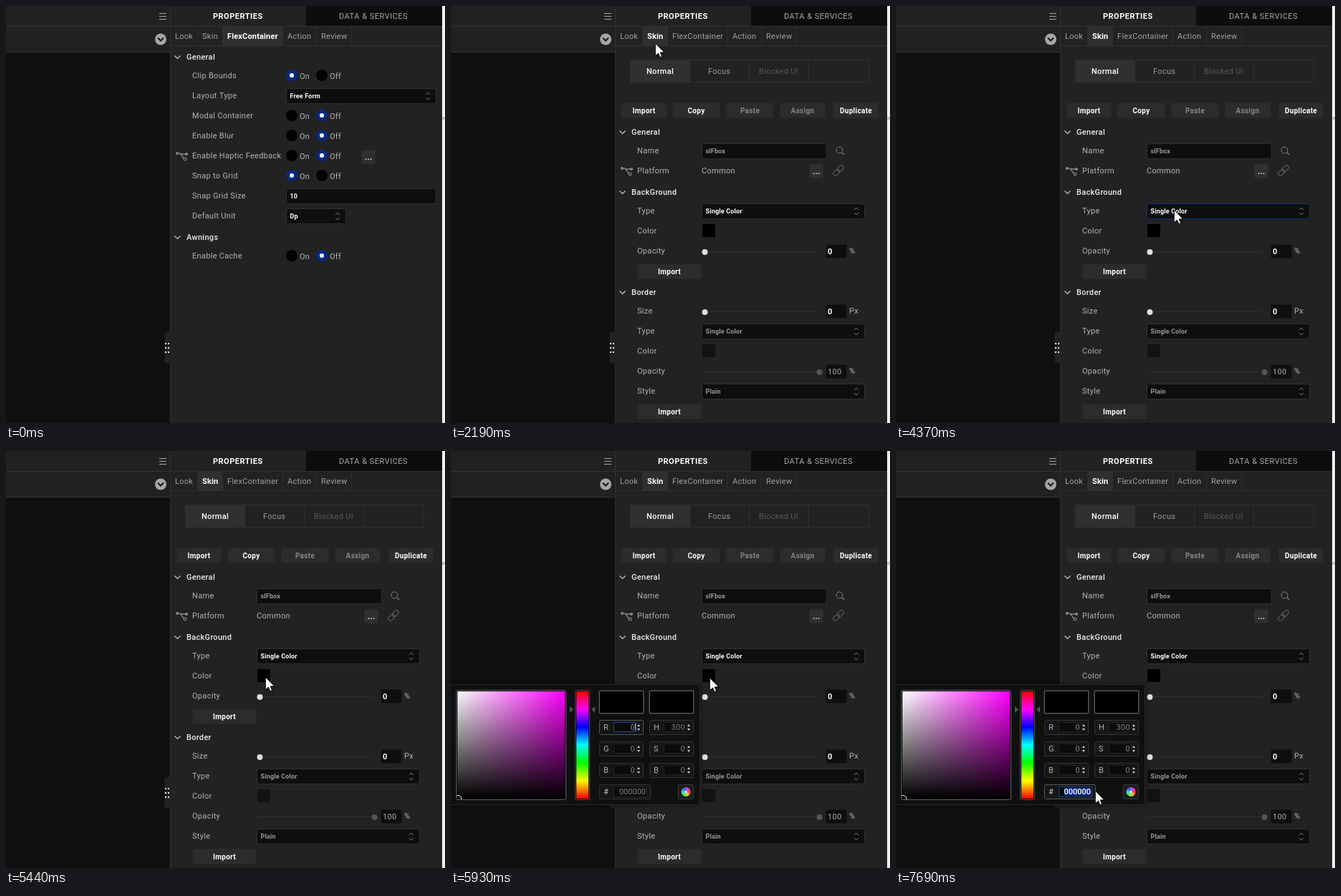
Animation of 613 by 583 pixels, one loop 8000 ms. Source, as an HTML page with a canvas:

```html
<!DOCTYPE html>
<html lang="en">
<head>
<meta charset="utf-8">
<title>Properties panel</title>
<style>
html, body { margin: 0; width: 100%; height: 100%; overflow: hidden; background: #101010; }
canvas { display: block; }
</style>
</head>
<body>
<canvas id="stage" width="613" height="583"></canvas>
<script>
const LOOP = 8000;
const screen = document.getElementById('stage').getContext('2d');
const layer = document.createElement('canvas');
layer.width = 613;
layer.height = 583;
const popup = layer.getContext('2d');
let g = screen;

const GREY = '#b4b4b4', DIM = '#858585', WHITE = '#fff', BLUE = '#062a80';

// ---- drawing helpers ----
function rect(x, y, w, h, color) {
  g.fillStyle = color;
  g.fillRect(x, y, w, h);
}
function box(x, y, w, h, fill, border, radius = 2) {
  g.beginPath();
  g.roundRect(x + .5, y + .5, w - 1, h - 1, radius);
  g.fillStyle = fill;
  g.fill();
  if (border) {
    g.strokeStyle = border;
    g.lineWidth = 1;
    g.stroke();
  }
}
function line(color, width, ...pts) {
  g.beginPath();
  for (let i = 0; i < pts.length; i += 2) g.lineTo(pts[i], pts[i + 1]);
  g.strokeStyle = color;
  g.lineWidth = width;
  g.stroke();
}
function shape(color, ...pts) {
  g.beginPath();
  for (let i = 0; i < pts.length; i += 2) g.lineTo(pts[i], pts[i + 1]);
  g.closePath();
  g.fillStyle = color;
  g.fill();
}
function dot(x, y, r, color) {
  g.beginPath();
  g.arc(x, y, r, 0, 7);
  g.fillStyle = color;
  g.fill();
}
function ring(x, y, r, color) {
  g.beginPath();
  g.arc(x, y, r, 0, 7);
  g.strokeStyle = color;
  g.lineWidth = 1;
  g.stroke();
}
// y is the middle of the line of text
function text(s, x, y, { color = GREY, size = 11, weight = 400, gap = .3, align = 'left' } = {}) {
  g.font = `${weight} ${size}px Roboto, sans-serif`;
  g.letterSpacing = gap + 'px';
  g.textAlign = align;
  g.fillStyle = color;
  g.fillText(s, x, y + Math.round(size * .36));
}

// ---- widgets ----
const label = (s, y) => text(s, 260, y);

function heading(s, y) {
  line('#c8c8c8', 1.2, 235.5, y - 1.5, 239.5, y + 2.5, 243.5, y - 1.5);
  text(s, 252, y, { color: '#ececec', weight: 500 });
}
function button(s, x, y, w, color = WHITE) {
  box(x, y, w, 22, '#2c2c2c');
  text(s, x + w / 2, y + 11, { color, size: 10, weight: 700, align: 'center' });
}
function more(x, y) {
  box(x, y, 20, 20, '#303030');
  text('...', x + 5, y + 10, { color: WHITE, weight: 700 });
}
function field(s, x, y, w, color = WHITE, border = '#303030') {
  box(x, y, w, 22, '#0e0e0e', border, 3);
  text(s, x + 5.5, y + 11, { color, size: 9, weight: 700, gap: .15 });
}
function select(s, x, y, w, color, border) {
  field(s, x, y, w, color, border);
  const cx = x + w - 12, cy = y + 11;
  line('#777', 1, cx - 3, cy - 2, cx, cy - 5, cx + 3, cy - 2);
  line('#777', 1, cx - 3, cy + 2, cx, cy + 5, cx + 3, cy + 2);
}
function radio(x, y, s, on) {
  dot(x, y, 8, on ? BLUE : '#030303');
  if (on) dot(x, y, 3, WHITE);
  text(s, x + 11, y + 1);
}
function toggle(s, y, on) {
  label(s, y);
  radio(399, y, 'On', on);
  radio(441, y, 'Off', !on);
}
function slider(s, y, x, value, unit, active) {
  label(s, y);
  line('#303030', 1, 351, y + 1.5, 511, y + 1.5);
  dot(x, y + 2, 4, active ? '#dedede' : '#555');
  box(523, y - 9, 30, 20, '#0e0e0e');
  text(value, 526, y + 1, { color: active ? WHITE : '#8c8c8c', weight: active ? 700 : 500 });
  text(unit, 556, y);
}
function fork(y) {
  line('#a0a0a0', 1.2, 238, y - 4, 243, y - 4, 246, y, 248, y + 3);
  line('#a0a0a0', 1.2, 243, y - 3, 253, y - 3);
  ring(239, y - 4, 1.5, '#a0a0a0');
  ring(252, y - 3, 1.5, '#a0a0a0');
  ring(250, y + 4, 2, '#a0a0a0');
}

// ---- panels ----
function frame(active) {
  rect(0, 0, 613, 583, '#101010');
  rect(0, 0, 229, 65, '#212121');
  rect(0, 28, 229, 1, '#343434');
  rect(0, 64, 229, 1, '#343434');
  for (let y = 10; y < 19; y += 4) rect(214, y, 10, 1, '#a8a8a8');
  dot(216, 46.5, 8, '#a6a6a6');
  line('#141414', 2, 212, 44.5, 216, 48.5, 220, 44.5);

  rect(229, 0, 380, 583, '#222');
  rect(229, 0, 1, 583, '#303030');
  rect(419, 0, 190, 28, '#0d0d0d');
  rect(230, 28, 379, 1, '#303030');
  rect(230, 55, 379, 1, '#303030');
  rect(609, 0, 4, 583, '#f1f1f1');
  rect(609, 155, 4, 4, '#c4c4c4');
  text('PROPERTIES', 289, 14, { color: WHITE, weight: 700, gap: .5 });
  text('DATA & SERVICES', 465, 14, { color: '#a8a8a8', gap: .5 });

  const tabs = [['Look', 230, 267], ['Skin', 267, 302], ['FlexContainer', 302, 386],
                ['Action', 386, 433], ['Review', 433, 482]];
  for (const [name, left, right] of tabs) {
    const on = name === active;
    if (on) rect(left, 29, right - left, 26, '#2f2f2f');
    rect(right, 29, 1, 26, '#2f2f2f');
    text(name, left + (left > 230 ? 7 : 6), 42,
      { color: on ? WHITE : '#a2a2a2', weight: on ? 700 : 400, gap: on ? .15 : .3 });
  }
  box(221, 455, 14, 45, '#222', null, 3);
  rect(229, 455, 1, 45, '#222');
  for (let i = 0; i < 6; i++) rect(222 + i % 2 * 4, 471 + (i >> 1) * 6, 2, 2, WHITE);
}

function containerPage() {
  heading('General', 71);
  toggle('Clip Bounds', 97, true);
  label('Layout Type', 125);
  select('Free Form', 391, 115, 210);
  toggle('Modal Container', 153, false);
  toggle('Enable Blur', 181, false);
  fork(210);
  toggle('Enable Haptic Feedback', 209, false);
  more(496, 201);
  toggle('Snap to Grid', 237, true);
  label('Snap Grid Size', 265);
  field('10', 391, 255, 210);
  label('Default Unit', 293);
  select('Dp', 391, 283, 84);
  heading('Awnings', 323);
  toggle('Enable Cache', 349, false);
}

function skinPage(focused, open) {
  box(250, 75, 334, 32, '#222', '#2f2f2f', 0);
  rect(250, 75, 84, 32, '#303030');
  rect(416, 75, 1, 32, '#2f2f2f');
  rect(499, 75, 1, 32, '#2f2f2f');
  text('Normal', 273, 91, { color: WHITE, weight: 500 });
  text('Focus', 359, 91, { color: '#9a9a9a' });
  text('Blocked UI', 430, 91, { color: '#585858' });

  button('Import', 238, 135, 63);
  button('Copy', 309, 135, 67);
  button('Paste', 384, 135, 67, DIM);
  button('Assign', 459, 135, 64, DIM);
  button('Duplicate', 534, 135, 63);

  heading('General', 176);
  label('Name', 202);
  field('slFbox', 350, 192, 175, '#989898');
  ring(542.5, 201.5, 4.5, '#808080');
  line('#808080', 1.2, 546, 205, 549, 208);
  fork(231);
  label('Platform', 230);
  text('Common', 350, 230);
  more(500, 221);
  g.save();
  g.translate(541, 230);
  g.rotate(-Math.PI / 4);
  for (const x of [-9, -1]) {
    g.beginPath();
    g.roundRect(x, -3, 10, 6, 3);
    g.strokeStyle = '#606060';
    g.stroke();
  }
  g.restore();

  heading('BackGround', 260);
  label('Type', 286);
  select('Single Color', 350, 276, 228, WHITE, focused ? '#0b357f' : undefined);
  label('Color', 314);
  rect(351, 305, 18, 18, '#000');
  slider('Opacity', 342, 354.5, '0', '%', true);
  button('Import', 260, 360, 90);

  heading('Border', 400);
  slider('Size', 426, 354.5, '0', 'Px', true);
  label('Type', 454);
  select('Single Color', 350, 444, 228, '#989898');
  label('Color', 482);
  rect(351, 473, 18, 18, '#121212');
  slider('Opacity', 510, 514.5, '100', '%', false);
  label('Style', 538);
  select('Plain', 350, 528, 228, '#989898');
  button('Import', 260, 556, 90);

  if (open) {
    rect(350, 298, 228, 50, '#0e0e0e');
    rect(351, 299, 226, 12, BLUE);
    ['Single Color', 'Two Step Gradient', 'Four Step Gradient', 'Image'].forEach((s, i) =>
      text(s, 355.5, 305 + i * 12, { color: WHITE, size: 9, weight: 700, gap: .15 }));
  }
}

// ---- colour picker ----
function gradient(x0, y0, x1, y1, ...colors) {
  const fill = g.createLinearGradient(x0, y0, x1, y1);
  colors.forEach((c, i) => fill.addColorStop(i / (colors.length - 1), c));
  return fill;
}
function channel(name, value, x, y, focused) {
  box(x, y - 10, 62, 21, '#161616', focused ? '#5a5a5a' : '#343434');
  text(name, x + 6, y);
  box(x + 20, y - 7, 32, 14, '#0b0b0b', focused ? '#174a9c' : '#242424', 0);
  text(value, x + 50, y, { color: '#858585', align: 'right' });
  shape('#d0d0d0', x + 53, y - 1, x + 57, y - 1, x + 55, y - 4);
  shape('#d0d0d0', x + 53, y + 2, x + 57, y + 2, x + 55, y + 5);
  if (focused) rect(x + 50, y - 5, 1, 10, '#aaa');
}
function picker(hexFocus) {
  g.clearRect(0, 0, 613, 583);
  g.save();
  g.shadowColor = '#000a';
  g.shadowBlur = 6;
  box(-6, 326, 354, 169, '#0f1010', null, 4);
  g.restore();
  box(-6, 326, 354, 169, '#0f1010', '#252b2a', 4);

  box(7, 334, 154, 154, '#000', '#666');
  rect(9, 336, 150, 150, gradient(9, 0, 159, 0, '#fff', '#f0f'));
  rect(9, 336, 150, 150, gradient(0, 336, 0, 486, '#0000', '#000'));
  g.save();
  g.beginPath();
  g.rect(8, 335, 152, 152);
  g.clip();
  ring(10, 486, 4.5, WHITE);
  g.restore();

  box(173, 334, 21, 154, '#000', '#555');
  rect(175, 336, 17, 150, gradient(0, 336, 0, 486,
    '#f00', '#f0f', '#00f', '#0ff', '#0f0', '#ff0', '#f00'));
  shape('#555', 166, 357, 166, 366, 171, 361.5);
  shape('#555', 201, 357, 201, 366, 196, 361.5);

  for (const x of [207, 277]) {
    box(x - 1, 334, 64, 34, '#555');
    rect(x + 1, 336, 60, 30, '#000');
  }
  channel('R', '0', 207, 386, !hexFocus);
  channel('G', '0', 207, 416);
  channel('B', '0', 207, 446);
  channel('H', '300', 277, 386);
  channel('S', '0', 277, 416);
  channel('B', '0', 277, 446);

  box(207, 466, 72, 21, '#161616', hexFocus ? '#5a5a5a' : '#343434');
  text('#', 213, 476, { color: '#c8c8c8' });
  box(227, 469, 47, 15, '#0b0b0b', hexFocus ? '#174a9c' : '#242424', 0);
  if (hexFocus) rect(235, 471, 37, 11, BLUE);
  text('000000', 272, 476, { color: hexFocus ? WHITE : '#858585', weight: hexFocus ? 500 : 400,
    gap: 0, align: 'right' });

  box(317, 466, 22, 21, '#1c1c1c', '#3a3a3a');
  const wheel = g.createConicGradient(0, 328, 476.5);
  ['#f44', '#fc3', '#5e4', '#3dd', '#45f', '#e4e', '#f44'].forEach((c, i) => wheel.addColorStop(i / 6, c));
  dot(328, 476.5, 6.5, wheel);
  dot(328, 476.5, 2, '#fffa');
}

// ---- pointer ----
const glide = u => u * u * (3 - 2 * u);
const brake = u => 1 - (1 - u) ** 2.6;
// start, end, from x, y, to x, y, easing
const moves = [
  [500, 1280, 600, 498, 288, 56, brake],
  [1280, 1340, 288, 56, 279, 57, glide],
  [1340, 1470, 279, 57, 285, 52, glide],
  [2920, 3710, 285, 52, 388, 285, glide],
  [4630, 5030, 388, 285, 357, 320, glide],
  [5030, 5310, 357, 320, 362, 316, glide],
  [5900, 6720, 362, 316, 236, 472, glide],
  [7120, 7360, 236, 472, 278, 475, glide]
];
function pointer(t) {
  const move = moves.findLast(m => t >= m[0]);
  if (!move) return;
  const [start, end, x0, y0, x1, y1, ease] = move;
  const k = ease(Math.min(1, (t - start) / (end - start)));
  const x = Math.round(x0 + (x1 - x0) * k), y = Math.round(y0 + (y1 - y0) * k);

  if (t > 6300 && x > 227 && x < 274 && y > 465) {
    rect(x, y - 7, 1, 15, WHITE);
    for (const dy of [-8, 8]) {
      rect(x - 3, y + dy, 3, 1, WHITE);
      rect(x + 1, y + dy, 3, 1, WHITE);
    }
    return;
  }
  g.save();
  g.translate(x + .5, y + .5);
  g.shadowColor = '#0009';
  g.shadowBlur = 2;
  g.shadowOffsetX = g.shadowOffsetY = 1;
  shape(WHITE, 0, 0, 0, 17, 4, 13.5, 6.5, 19, 9, 18, 6.6, 12.5, 12, 12);
  g.shadowColor = 'transparent';
  g.strokeStyle = '#111';
  g.lineWidth = .8;
  g.stroke();
  g.restore();
}

function draw(t) {
  g = screen;
  const skin = t >= 2130;
  frame(skin ? 'Skin' : 'FlexContainer');
  if (skin) skinPage(t >= 3910 && t < 5440, t >= 3910 && t < 4370);
  else containerPage();

  const fade = glide(Math.max(0, Math.min(1, (t - 5560) / 400)));
  if (fade) {
    g = popup;
    picker(t >= 7120);
    g = screen;
    g.globalAlpha = fade;
    g.drawImage(layer, 0, 0);
    g.globalAlpha = 1;
  }
  pointer(t);
}

const begin = performance.now();
function tick() {
  draw((performance.now() - begin) % LOOP);
  requestAnimationFrame(tick);
}
tick();
</script>
</body>
</html>
```
